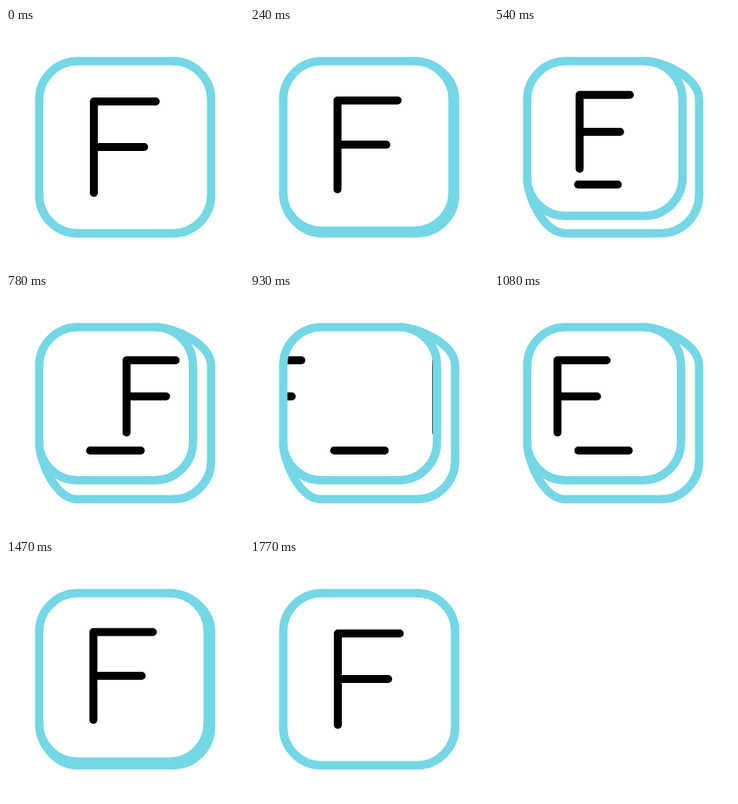
Write an HTML page that moves like this. It is 298 px wide and 298 px high and loops after 1860 ms.

```html
<!DOCTYPE html>
<html lang="en">
<head>
<meta charset="utf-8">
<title>Key</title>
<style>
  html, body { margin: 0; width: 100%; height: 100%; overflow: hidden; background: #fff; }
  svg { display: block; width: 100%; height: 100%; }
  .edge { fill: none; stroke: #74d7e6; stroke-width: 10.5; }
  .ink { fill: none; stroke: #000; stroke-width: 10; stroke-linecap: round; stroke-linejoin: round; }
</style>
</head>
<body>
<svg viewBox="0 0 298 298">
  <defs>
    <clipPath id="clip"><rect class="face" x="41.6" y="41.6" rx="48"/></clipPath>
  </defs>
  <path class="edge" id="side"/>
  <rect class="face" x="41.6" y="41.6" rx="48" fill="#fff"/>
  <g clip-path="url(#clip)">
    <path class="ink" id="letter"/>
    <path class="ink" id="nextLetter"/>
  </g>
  <path class="ink" id="underline"/>
  <rect class="face edge" x="41.6" y="41.6" rx="48"/>
</svg>
<script>
const LOOP = 1860, STEP = 30, SPACING = 230.5;
const NEAR = 41.6, RIGHT = 256.8, BOTTOM = 257, RADIUS = 48, HANDLE = RADIUS * 0.552;
const faces = document.querySelectorAll('.face');
const [side, letter, nextLetter, underline] =
  ['side', 'letter', 'nextLetter', 'underline'].map(id => document.getElementById(id));

const lerp = (a, b, p) => a + (b - a) * p;
const span = (t, from, to) => Math.min(1, Math.max(0, (t - from) / (to - from)));
const smooth = x => x * x * (3 - 2 * x);

// Cubic bezier (.333, 0, .1, 1): quick start, long settling tail.
function settle(x) {
  let lo = 0, hi = 1;
  for (let i = 0; i < 24; i++) {
    const s = (lo + hi) / 2, r = 1 - s;
    if (r * r * s + 0.3 * r * s * s + s * s * s < x) lo = s; else hi = s;
  }
  return smooth((lo + hi) / 2);
}

// The side is tied to the face where the face's outer corners begin.
function sidePath(faceRight, faceBottom) {
  const x = faceRight - RADIUS, y = faceBottom - RADIUS;
  const bend = RADIUS - HANDLE;
  return `M${x} ${NEAR}C${x + HANDLE} ${NEAR} ${RIGHT} ${NEAR + bend} ${RIGHT} ${NEAR + RADIUS}` +
    `V${BOTTOM - RADIUS}A${RADIUS} ${RADIUS} 0 0 1 ${RIGHT - RADIUS} ${BOTTOM}H${NEAR + RADIUS}` +
    `C${NEAR + bend} ${BOTTOM} ${NEAR} ${y + HANDLE} ${NEAR} ${y}`;
}

function letterPath(press, shift) {
  const stem = lerp(110, 107, press) + shift;
  const top = lerp(92, 83, press), bottom = lerp(206.5, 173.5, press);
  const barEnd = lerp(187.5, 168.5, press) + shift;
  const mid = lerp(149, 128.3, press), midEnd = lerp(173, 156.5, press) + shift;
  return `M${barEnd} ${top}H${stem}V${bottom}M${stem} ${mid}H${midEnd}`;
}

function draw(t) {
  const press = smooth(span(t, 120, 630)) - settle(span(t, 1200, 1770));
  const faceRight = lerp(RIGHT, 234.2, press), faceBottom = lerp(BOTTOM, 233.3, press);
  for (const face of faces) {
    face.setAttribute('width', faceRight - NEAR);
    face.setAttribute('height', faceBottom - NEAR);
  }
  side.setAttribute('d', sidePath(faceRight, faceBottom));

  const slide = smooth(span(t, 614, 1208)) * SPACING;
  letter.setAttribute('d', letterPath(press, slide));
  nextLetter.setAttribute('d', letterPath(press, slide - SPACING));

  const head = smooth(span(t, 365, 615)), tail = smooth(span(t, 1070, 1320));
  underline.setAttribute('d', head > tail
    ? `M${lerp(105.3, 168.7, tail)} 196H${lerp(105.3, 168.7, head)}` : '');
}

const start = performance.now();
function tick() {
  const t = (performance.now() - start) % LOOP;
  draw(Math.floor(t / STEP) * STEP);
  requestAnimationFrame(tick);
}
tick();
</script>
</body>
</html>
```
